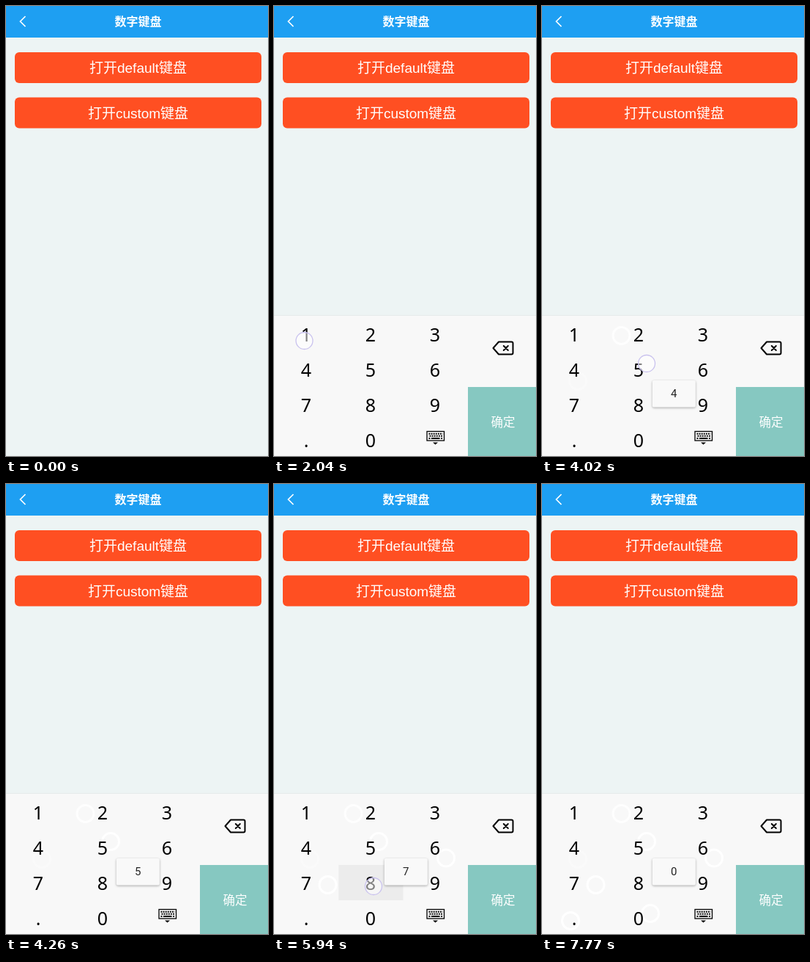
An HTML page that plays this animation: 358 by 613 pixels, repeating every 8 s.

```html
<!DOCTYPE html>
<html lang="zh-CN">
<head>
<meta charset="utf-8">
<title>数字键盘</title>
<style>
html, body { margin: 0; width: 100%; height: 100%; overflow: hidden; background: #edf4f4; }
svg { display: block; width: 358px; height: 613px; }
text { text-anchor: middle; }
.label { font: 300 19px "Liberation Sans", "Noto Sans CJK SC", "Noto Sans CJK", sans-serif; fill: #fff; }
.title { font: bold 16px "Noto Sans CJK SC", "Noto Sans CJK", sans-serif; fill: #fff; }
.ok { font: 400 16.5px "Noto Sans CJK SC", "Noto Sans CJK", sans-serif; fill: #fff; }
.digit { font: 25px "Noto Sans", "Open Sans", sans-serif; fill: #000; }
.toast { font: 15px Roboto, "Noto Sans", sans-serif; fill: #222; }
.line { fill: none; stroke: #000; stroke-width: 2; stroke-linejoin: round; stroke-linecap: round; }
#box { filter: drop-shadow(0 1px 1.5px rgba(0, 0, 0, .33)); }
</style>
</head>
<body>
<svg viewBox="0 0 358 613">
  <rect width="358" height="613" fill="#edf4f4"/>
  <rect width="358" height="43" fill="#1e9ff2"/>
  <path d="M26.5 14L19.5 21L26.5 28" fill="none" stroke="#fff" stroke-width="1.7"/>
  <text class="title" x="180.5" y="27">数字键盘</text>
  <g fill="#ff4f22">
    <rect x="12" y="63" width="337" height="42" rx="6"/>
    <rect x="12" y="124.500" width="337" height="42" rx="6"/>
  </g>
  <text class="label" x="180.5" y="90.500">打开default键盘</text>
  <text class="label" x="180.5" y="152.500">打开custom键盘</text>

  <g id="pad">
    <rect y="421.500" width="358" height="192" fill="#f8f8f8"/>
    <rect y="421" width="358" height="1" fill="#e6eaea"/>
    <rect id="press" fill="#ececec"/>
    <g id="marks" fill="none" stroke="#fff" stroke-width="3"></g>
    <g id="digits"></g>
    <path class="line" d="M299.500 466L307 457.500H324.500Q326.500 457.500 326.500 459.500V472.500Q326.500 474.500 324.500 474.500H307Z"/>
    <path class="line" d="M313.800 463L319.800 469M319.800 463L313.800 469"/>
    <rect x="209" y="579.500" width="23.500" height="12.500" fill="none" stroke="#000" stroke-width="1.3"/>
    <path d="M211.500 582.700H230.500M212.500 585.700H230" stroke="#000" stroke-width="1.900" stroke-dasharray="1.900 1.200"/>
    <path d="M211.500 589H213.500M215 589H226.500M228 589H230" stroke="#000" stroke-width="1.900"/>
    <path d="M217 594.500H224L220.500 597.500Z"/>
    <rect x="265" y="519" width="93" height="94" fill="#86c8c1"/>
    <text class="ok" x="313" y="573">确定</text>
  </g>

  <g id="toast">
    <rect id="box" y="510" height="36.500" rx="2" fill="#f9f9f9"/>
    <text id="word" class="toast" x="180.300" y="533"></text>
  </g>
  <circle id="ring" r="11.500" fill="#fff" fill-opacity=".5" stroke="#c9c2ee" stroke-width="1.300"/>
</svg>
<script>
const LOOP = 8000, TICK = 30;
const KEYS = ['1', '2', '3', '4', '5', '6', '7', '8', '9', '.', '0'];
const COL = 88.25, ROW = 48.2, TOP = 422.5;

// start, length, x, y, key, strength of the mark left behind, long press
const TAPS = [
  [720, 240, 184, 84],
  [2040, 240, 41.5, 456, '1', 0],
  [2460, 240, 108.5, 449, '2', .8],
  [2850, 240, 217, 450, '3', 0],
  [3510, 240, 49, 511, '4', .3],
  [4020, 240, 143, 487, '5', .9, true],
  [4560, 270, 235, 509.5, '6', .9, true],
  [5130, 210, 73.5, 546, '7', 1],
  [5820, 270, 136, 548, '8', 0, true],
  [6300, 270, 226, 546, '9', 0],
  [7050, 210, 39, 595, '.', 1, true],
  [7500, 270, 148, 585, '0', .9]
].map(([start, length, x, y, key, mark, long]) => ({ start, length, x, y, key, mark, long }));

const $ = id => document.getElementById(id);
const clamp = v => Math.max(0, Math.min(1, v));

function set(el, attrs) {
  for (const name in attrs) el.setAttribute(name, attrs[name]);
  return el;
}

function add(parent, tag, attrs) {
  const el = document.createElementNS('http://www.w3.org/2000/svg', tag);
  parent.append(el);
  return set(el, attrs);
}

KEYS.forEach((key, i) => {
  const el = add($('digits'), 'text', {
    class: 'digit', x: 44 + i % 3 * 88, y: 456.5 + Math.floor(i / 3) * 48
  });
  el.textContent = key;
});

for (const tap of TAPS) {
  if (tap.mark) tap.dot = add($('marks'), 'circle', { cx: tap.x, cy: tap.y, r: 11.5 });
}

function padOffset(t) {
  if (t < 1140) return 200;
  return t < 1170 ? 144 : t < 1200 ? 60 : 0;
}

// Full while held, then a quick fall to nothing.
function ringAlpha(tap, t) {
  const left = tap.start + tap.length - t;
  if (t < tap.start || left <= 0) return 0;
  return clamp(left / 120) ** 2;
}

function draw(t) {
  set($('pad'), { transform: `translate(0 ${padOffset(t)})` });

  let ring = 0, pressed = null, shown = null;
  for (const tap of TAPS) {
    const alpha = ringAlpha(tap, t);
    const release = tap.start + tap.length - 90;
    if (alpha) {
      ring = alpha;
      set($('ring'), { cx: tap.x, cy: tap.y });
    }
    if (tap.dot) set(tap.dot, { opacity: t < release ? 0 : tap.mark * (1 - alpha) });
    if (tap.long && t >= tap.start + 60 && t < release) pressed = tap;
    if (tap.key && t >= release) shown = tap.key;
  }
  set($('ring'), { opacity: ring });

  set($('press'), { opacity: pressed ? 1 : 0 });
  if (pressed) {
    const i = KEYS.indexOf(pressed.key);
    set($('press'), {
      x: i % 3 * COL, y: TOP + Math.floor(i / 3) * ROW, width: COL, height: ROW
    });
  }

  set($('toast'), { opacity: shown ? clamp((t - 2160) / 180) : 0 });
  if (shown) {
    const width = shown === '.' ? 55 : 59;
    set($('box'), { x: 180.3 - width / 2, width });
    $('word').textContent = shown;
  }
}

const began = performance.now();
function frame() {
  const t = (performance.now() - began) % LOOP;
  draw(Math.floor(t / TICK) * TICK);
  requestAnimationFrame(frame);
}
frame();
</script>
</body>
</html>
```
